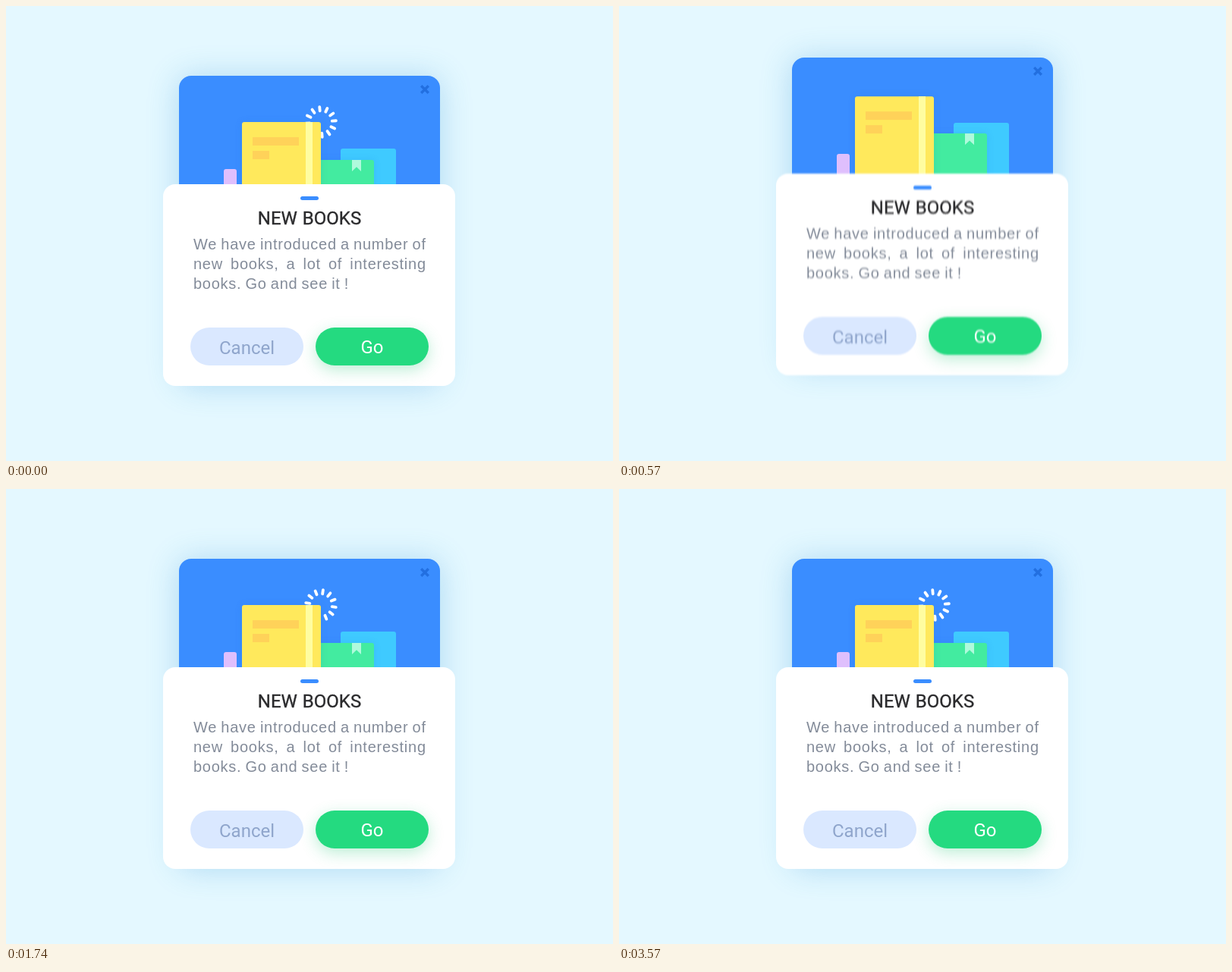
Recreate the animation shown at these times as an HTML page. Size 800 by 600 pixels, loop 3.6 s.

```html
<!DOCTYPE html>
<html lang="en">
<head>
<meta charset="utf-8">
<title>New books popup</title>
<style>
  html, body { margin: 0; width: 100%; height: 100%; overflow: hidden; background: #e4f8ff; }
  #stage { position: relative; width: 800px; height: 600px; overflow: hidden; background: #e4f8ff; }
  #stage div, #stage svg { position: absolute; }
  #header { left: 228px; top: 92px; width: 344px; height: 406px; border-radius: 16px;
    background: #3a8dff; box-shadow: 0 2px 40px rgba(50, 150, 215, .32); }
  #spinner { left: 390px; top: 128px; }
  .book { border-radius: 3px 3px 0 0; }
  #cyan { left: 441px; top: 188px; width: 73px; height: 120px; background: #3fcaff; }
  #green { left: 405px; top: 203px; width: 80px; height: 110px; background: #43eba0;
    box-shadow: 0 0 10px rgba(30, 110, 220, .16); }
  #mark { left: 51px; top: 0; width: 12px; height: 15px; background: #b0fadc;
    clip-path: polygon(0 0, 100% 0, 100% 100%, 50% 62%, 0 100%); }
  #yellow { left: 311px; top: 153px; width: 104px; height: 160px; background: #ffe95c;
    box-shadow: 0 0 10px rgba(30, 110, 220, .16); }
  #yellow div { background: #ffd259; height: 11px; left: 14px; }
  #yellow .spine { left: 84px; top: 0; width: 9px; height: 160px; background: #fffda0; }
  #pink { left: 287px; top: 215px; width: 17px; height: 90px; background: #dfbffd; }
  #panel { left: 207px; top: 235px; width: 385px; height: 266px; border-radius: 16px; background: #fff; }
  #dash { left: 181px; top: 16px; width: 24px; height: 5px; border-radius: 2.5px; background: #3a8dff; }
  #title { left: 0; top: 31px; width: 386px; text-align: center; color: #2b2b2d;
    font: 24px/28px Roboto, sans-serif; word-spacing: 1px; -webkit-text-stroke: .35px #2b2b2d; }
  #text { left: 40px; top: 66px; width: 306.8px; text-align: justify; color: #838b99;
    font: 20px/26px "Liberation Sans", Arial, sans-serif; letter-spacing: .75px; word-spacing: -1.2px; }
  .button { top: 189px; width: 149px; height: 50px; border-radius: 25px; text-align: center;
    font: 24px/54px Roboto, sans-serif; }
  #cancel { left: 36px; background: #dae8ff; color: #8fa5cc; }
  #go { left: 201px; background: #24da80; color: #fff; line-height: 52px;
    box-shadow: 0 6px 20px rgba(36, 200, 120, .3); }
</style>
</head>
<body>
<div id="stage">
  <div id="header">
    <svg style="left:318px;top:12px" width="12" height="12" stroke="#226fe0" stroke-width="3.4">
      <path d="M1.2 1.2 10.8 10.8M10.8 1.2 1.2 10.8"/>
    </svg>
  </div>
  <svg id="spinner" width="50" height="50" viewBox="-25 -25 50 50">
    <g id="spokes" stroke="#fff" stroke-width="3.8" stroke-linecap="round"></g>
  </svg>
  <div id="cyan" class="book"></div>
  <div id="green" class="book"><div id="mark"></div></div>
  <div id="yellow" class="book">
    <div class="spine"></div>
    <div style="top:20px;width:61px"></div>
    <div style="top:38px;width:22px"></div>
  </div>
  <div id="pink" class="book"></div>
  <div id="panel">
    <div id="dash"></div>
    <div id="title">NEW BOOKS</div>
    <div id="text">We have introduced a number of new books, a lot of interesting books. Go and see it !</div>
    <div id="cancel" class="button">Cancel</div>
    <div id="go" class="button">Go</div>
  </div>
  <svg width="0" height="0">
    <filter id="smear" x="-5%" y="-20%" width="110%" height="140%" color-interpolation-filters="sRGB">
      <feGaussianBlur id="blur" stdDeviation="0 0"/>
    </filter>
  </svg>
</div>
<script>
  const STEP = 30, COUNT = 120;
  const RISE = 2, PEAK = 21;
  const $ = id => document.getElementById(id);

  // Start offset, overshoot and settling step of each part
  const parts = [
    ['header', 512, -31, 29],
    ['cyan', 505, -41, 28.5],
    ['green', 511, -42, 28.5],
    ['yellow', 517, -41, 30],
    ['pink', 509, -27, 26],
    ['panel', 517, -21, 26]
  ];
  const clamp = x => Math.min(1, Math.max(0, x));
  const smooth = u => u * u * (3 - 2 * u);

  // Flat-ended cubic Bezier easing with handles at x1 and x2
  function ease(u, x1, x2) {
    let lo = 0, hi = 1;
    for (let i = 0; i < 24; i++) {
      const s = (lo + hi) / 2, r = 1 - s;
      if (3 * r * r * s * x1 + 3 * r * s * s * x2 + s * s * s < u) lo = s;
      else hi = s;
    }
    return smooth((lo + hi) / 2);
  }

  function offset(k, [, from, over, end]) {
    if (k >= end) return 0;
    if (k >= PEAK) return over * (1 - smooth((k - PEAK) / (end - PEAK)));
    return from + (over - from) * ease(clamp((k - RISE) / (PEAK - RISE)), .575, .43);
  }

  for (let a = 0; a < 360; a += 30) {
    const line = document.createElementNS('http://www.w3.org/2000/svg', 'line');
    line.setAttribute('x1', 14.8);
    line.setAttribute('x2', 20);
    line.setAttribute('transform', `rotate(${a})`);
    $('spokes').append(line);
  }

  function draw(ms) {
    // The loop opens on its resting pose
    const k = Math.floor(ms / STEP) % COUNT || COUNT - 1;
    for (const part of parts) {
      $(part[0]).style.transform = `translateY(${offset(k, part).toFixed(2)}px)`;
    }
    const panel = parts[parts.length - 1];
    const speed = Math.abs(offset(k + .5, panel) - offset(k - .5, panel));
    const sigma = speed * .38 / Math.sqrt(12);
    $('blur').setAttribute('stdDeviation', `0 ${sigma.toFixed(2)}`);
    $('panel').style.filter = sigma > .1 ? 'url(#smear)' : 'none';

    $('spinner').style.opacity = clamp((k - 31) / 3);
    $('spokes').setAttribute('transform', `rotate(${(k - 92) * 20 / 3 - 5})`);
  }

  let start;
  function tick(now) {
    start ??= now;
    draw(Math.max(0, now - start));
    requestAnimationFrame(tick);
  }
  draw(0);
  requestAnimationFrame(tick);
</script>
</body>
</html>
```
